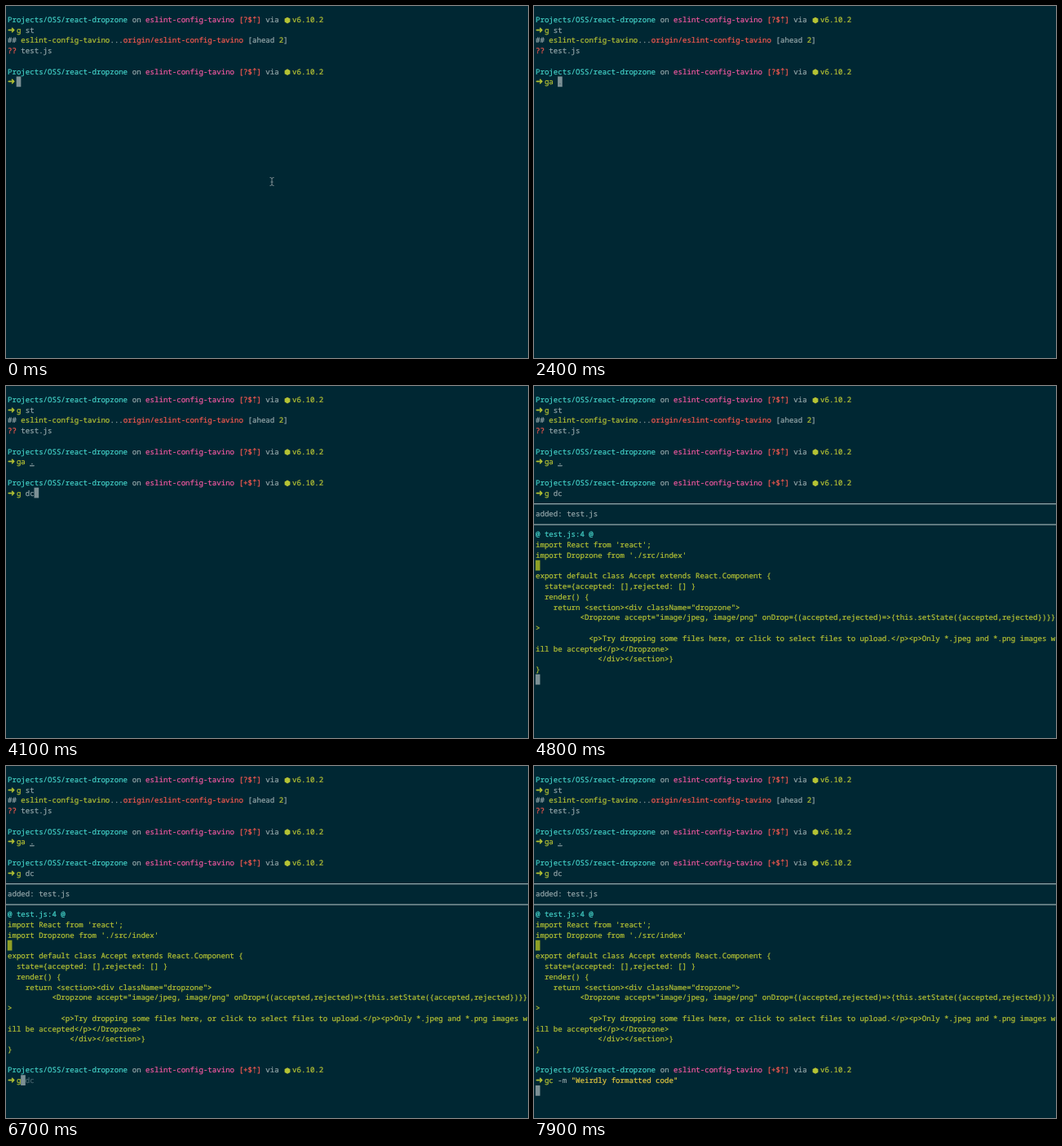
These frames come from a looping animation (640x432 px, 8000 ms). An HTML page:

```html
<!DOCTYPE html>
<html lang="en">
<head>
<meta charset="utf-8">
<title>Terminal session</title>
<style>
html, body { margin: 0; width: 100%; height: 100%; overflow: hidden; background: #002733; }
svg { display: block; width: 640px; height: 432px; }
text {
  font: 500 9.09px "Noto Sans Mono", "DejaVu Sans Mono", monospace;
  white-space: pre;
  font-variant-ligatures: none;
  text-rendering: geometricPrecision;
  stroke-width: .22px;
}
.symbol { font: 11px "DejaVu Sans", sans-serif; }
.under { text-decoration: underline; }
</style>
</head>
<body>
<svg id="stage" viewBox="0 0 640 432"></svg>
<script>
const LOOP = 8000, LEFT = 2, CELL = 5.455, LINE = 12.73;
const GREY = '#93a5a8', CYAN = '#43cfc6', PINK = '#f0579f', RED = '#f7594f',
      LIME = '#b5c234', YELLOW = '#e2c840', GHOST = '#48646d', BLOCK = '#7c9095';
const BRANCH = 'eslint-config-tavino';
const stage = document.getElementById('stage');

const colX = col => LEFT + col * CELL;
const rowMid = row => 17 + row * LINE;

function add(tag, attrs, content = '') {
  const node = document.createElementNS('http://www.w3.org/2000/svg', tag);
  for (const key in attrs) node.setAttribute(key, attrs[key]);
  node.textContent = content;
  stage.append(node);
}

// Writes a run of text and returns the column after it.
function write(row, col, content, fill, cls = '') {
  add('text', { x: colX(col), y: rowMid(row) + 3, fill, stroke: fill, class: cls }, content);
  return col + content.length;
}

function runs(row, ...parts) {
  parts.reduce((col, [content, fill]) => write(row, col, content, fill), 0);
}

function block(row, col, fill = BLOCK) {
  add('rect', { x: colX(col) - .2, y: rowMid(row) - 6.9, width: CELL + .2, height: LINE, fill });
}

function rule(row) {
  add('rect', { x: 0, y: rowMid(row) - .3, width: 640, height: 1.3, fill: GREY });
}

function prompt(row, flags) {
  runs(row, ['Projects/OSS/react-dropzone', CYAN], [' on ', GREY], [BRANCH, PINK],
    [` [${flags} ]`, RED], [' via', GREY]);
  const y = rowMid(row);
  const arrowX = colX(55.5);
  add('path', {
    d: `M${arrowX} ${y - 4}v3.2m0 .8v1.2m0 .8v1.2M${arrowX - 1.9} ${y - 2}l1.9 -2l1.9 2`,
    fill: 'none', stroke: RED
  });
  add('path', { d: `M345 ${y - 3.3}l3.4 1.9v3.9l-3.4 1.9l-3.4 -1.9v-3.9z`, fill: LIME });
  write(row, 64, 'v6.10.2', LIME);
  write(row + 1, 0, '➜', LIME, 'symbol');
}

function command(row, content) {
  const [, name, rest] = content.match(/^(\S*)(.*)$/);
  let col = write(row, 2, name, LIME);
  for (const part of rest.match(/"[^"]*"|\s+|[^\s"]+/g) || []) {
    col = write(row, col, part, part[0] === '"' ? YELLOW : GREY, part === '.' ? 'under' : '');
  }
  return col;
}

const CODE = [
  "import React from 'react';",
  "import Dropzone from './src/index'",
  '',
  'export default class Accept extends React.Component {',
  '  state={accepted: [],rejected: [] }',
  '  render() {',
  '    return <section><div className="dropzone">',
  '          <Dropzone accept="image/jpeg, image/png" onDrop={(accepted,rejected)=>{this.setState({accepted,rejected})}}',
  '>',
  '            <p>Try dropping some files here, or click to select files to upload.</p><p>Only *.jpeg and *.png images w',
  'ill be accepted</p></Dropzone>',
  '              </div></section>}',
  '}'
];

function diff() {
  rule(10);
  write(11, 0, 'added: test.js', GREY);
  rule(12);
  write(13, 0, '@ test.js:4 @', CYAN);
  CODE.forEach((line, i) => write(14 + i, 0, line, LIME));
  block(16, 0, '#8f9f25');
}

function mouse() {
  add('path', {
    d: 'M323.5 210.5q2.5 0 2.5 1.5q0 -1.5 2.5 -1.5M326 212v7M323.5 220.5q2.5 0 2.5 -1.5q0 1.5 2.5 1.5M324.5 216h3',
    fill: 'none', stroke: '#7d8c91', 'stroke-width': 1
  });
}

const COMMIT = ' -m "Weirdly formatted code"';

// Each screen takes input at a prompt row or waits for output at a row.
const SCREENS = [
  { input: 6 }, { wait: 7 }, { input: 9 }, { wait: 10 },
  { wait: 27 }, { input: 29 }, { wait: 30 }
];

// [time, screen, typed, suggestion, cursor visible]
const STEPS = [
  [0, 0, '', '', 1],
  [500, 0, '', '', 0],
  [700, 0, '', '', 1],
  [900, 0, 'g', ' st', 1],
  [1500, 0, 'g', ' st', 0],
  [1900, 0, 'g', ' st', 1],
  [2100, 0, 'ga', ' .', 1],
  [2300, 0, 'ga ', '.', 1],
  [2500, 0, 'ga .', '', 1],
  [2700, 1, '', '', 1],
  [3100, 1, 'g', '', 1],
  [3400, 2, 'g', ' st', 1],
  [3700, 2, 'g ', 'st', 1],
  [3900, 2, 'g d', 'c', 1],
  [4000, 2, 'g dc', '', 1],
  [4400, 3, '', '', 1],
  [4700, 4, '', '', 1],
  [5100, 5, '', '', 1],
  [6600, 5, 'g', ' dc', 1],
  [6900, 5, 'gc', COMMIT, 1],
  [7200, 5, 'gc' + COMMIT, '', 1],
  [7500, 6, '', '', 1]
];

function draw([time, screen, typed, ghost, cursor]) {
  stage.replaceChildren();
  add('rect', { width: 640, height: 432, fill: '#002733' });

  prompt(0, '?$');
  command(1, 'g st');
  runs(2, ['## ', GREY], [BRANCH, LIME], ['...', GREY], ['origin/' + BRANCH, RED],
    [' [ahead ', GREY], ['2', LIME], [']', GREY]);
  runs(3, ['??', RED], [' test.js', GREY]);

  prompt(5, '?$');
  if (screen > 0) command(6, 'ga .');
  if (screen > 1) prompt(8, '+$');
  if (screen > 2) command(9, 'g dc');
  if (screen > 3) diff();
  if (screen > 4) prompt(28, '+$');
  if (screen > 5) command(29, 'gc' + COMMIT);
  if (time < 900) mouse();

  const { input, wait } = SCREENS[screen];
  const row = input || wait;
  const col = input ? command(row, typed) : write(row, 0, typed, GREY, 'under');
  if (cursor) block(row, col);
  write(row, col, ghost, GHOST);
}

let shown;
function tick() {
  const time = performance.now() % LOOP;
  const step = STEPS.findLast(s => s[0] <= time);
  if (step !== shown) draw(shown = step);
  requestAnimationFrame(tick);
}
tick();
</script>
</body>
</html>
```
